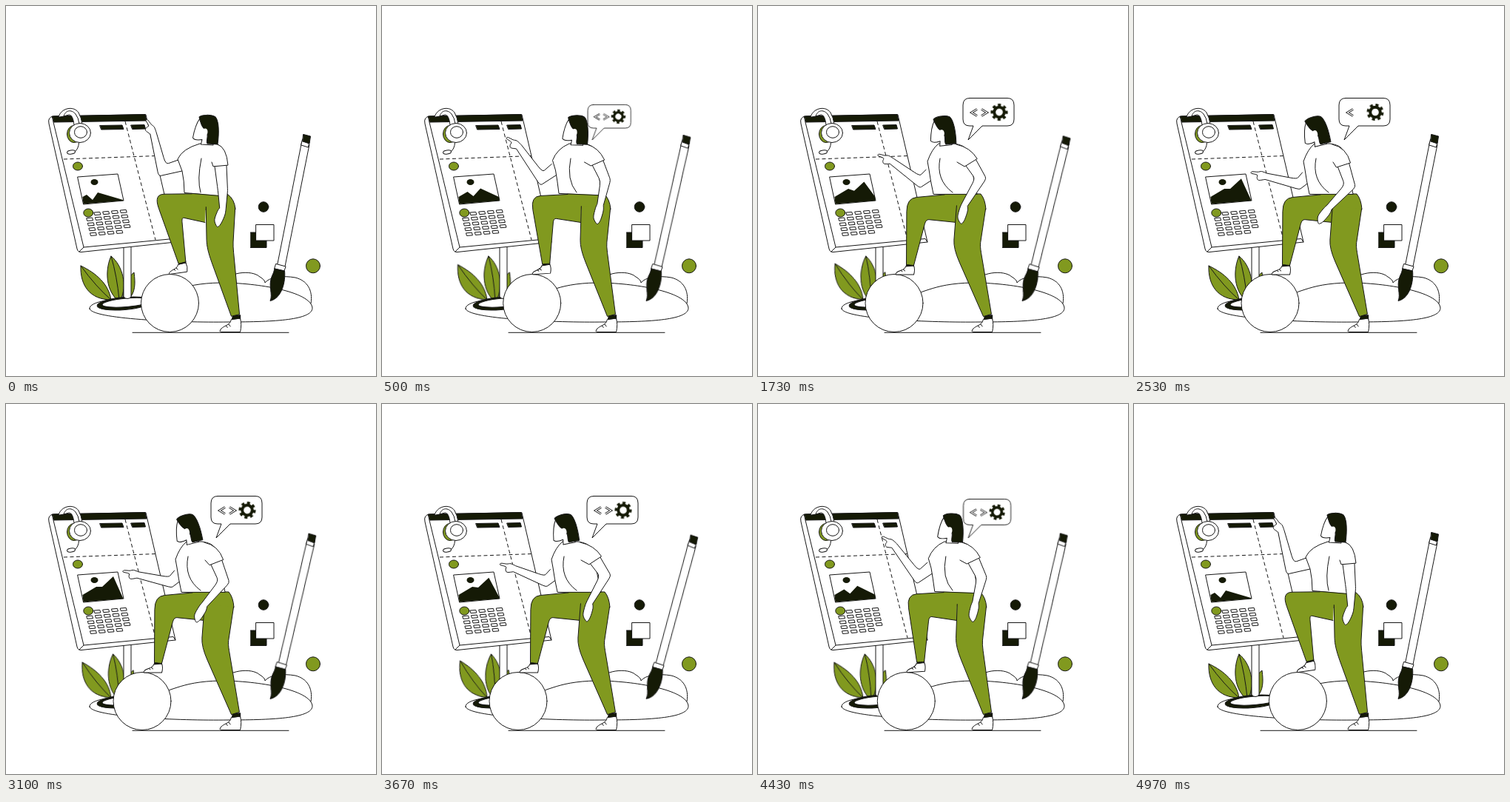
An HTML page that plays this animation: 500x500 px, repeating every 5000 ms.

```html
<!DOCTYPE html>
<html lang="en">
<head>
<meta charset="utf-8">
<title>Design board</title>
<style>
  html, body { margin: 0; width: 100%; height: 100%; overflow: hidden; background: #fff; }
  svg { display: block; width: 100vw; height: 100vh; }
  .line { fill: none; stroke: #161616; stroke-width: 1; stroke-linejoin: round; stroke-linecap: round; }
  .paper { fill: #fff; }
  .green { fill: #81991f; }
  .dark { fill: #151a06; }
  .solid { stroke: none; }
  .dash { stroke-dasharray: 5 3.5; stroke-linecap: butt; }

  .sway { animation: sway 1250ms cubic-bezier(.37,0,.63,1) infinite alternate; }
  @keyframes sway { to { transform: rotate(var(--turn)); } }
  #brush { --turn: 4deg; transform-origin: 358px 398px; }
  #leafA, #leafB { --turn: 5.5deg; transform-origin: 145px 397px; }
  #leafC { --turn: -3deg; transform-origin: 158px 397px; }

  #bubble { transform-origin: 284px 181px; animation: pop 5s cubic-bezier(.37,0,.63,1) infinite; }
  @keyframes pop {
    0%, 3% { transform: scale(0); }
    12.5%, 87% { transform: scale(1); }
    96.4%, 100% { transform: scale(0); }
  }
  #gear { transform-origin: 326px 143.5px; animation: spin 5s linear infinite; }
  @keyframes spin { to { transform: rotate(360deg); } }
  #teeth { stroke: #151a06; stroke-width: 4; stroke-dasharray: 1.05 .95; stroke-linecap: butt; }
  #close { animation: blink 2500ms step-end infinite; }
  @keyframes blink { 0% { opacity: 0; } 12% { opacity: 1; } }
  .rim { stroke-width: 2.8; stroke-linecap: butt; stroke-linejoin: miter; }
  .core { stroke: #fff; stroke-width: 1.2; stroke-linecap: butt; stroke-linejoin: miter; }
</style>
</head>
<body>
<svg viewBox="0 0 500 500" class="line">
  <!-- ground -->
  <path class="paper" d="M288 376C300 359 332 356 343 366Q350 370 350 374C356 366 374 364 391 367C407 371 415 384 412 402L350 410Z"/>
  <path class="paper" d="M113 409C112 399 145 395 190 393C224 391 232 375 290 374C340 374 412 386 414 408C414 424 365 427 300 427C235 428 114 423 113 409Z"/>
  <path d="M171 441.300H382"/>

  <!-- plant -->
  <g id="leafC" class="sway green"><path d="M158 396C157 378 164 367 173 360C175 375 175 387 166 396Z"/></g>
  <g id="leafA" class="sway">
    <path class="green" d="M142 397C139 376 122 361 101 351C100 377 113 397 142 397Z"/>
    <path d="M142 397Q122 380 101 351"/>
  </g>
  <g id="leafB" class="sway">
    <path class="green" d="M150 397C133 381 135 353 142 338C158 351 164 378 155 397Z"/>
    <path d="M153 397Q150 365 142 338"/>
  </g>

  <!-- stand -->
  <g transform="rotate(-5 160 402)">
    <ellipse class="dark" cx="160" cy="402" rx="37" ry="8.500"/>
    <ellipse class="paper" cx="163" cy="401" rx="33" ry="5.800"/>
  </g>
  <path class="paper" d="M159 320V393Q164 398 169 393V320Z"/>

  <!-- board -->
  <path class="paper" d="M64 149Q56 150 58 159L96 328Q97 333 102 332.500L229 319L189 147Z"/>
  <path d="M64 157L105 326L226 314.500L229 319M105 326L99 332"/>
  <path class="dark" d="M62.500 149L188 146.500L190 155L64.500 157Z"/>
  <path class="dark" d="M127 161.500L157 161L159 166.500L129 167ZM169 161L187 160.500L188.500 166L171 166.500Z"/>
  <path class="dash" d="M161 156L202 316M78 207L203 202.500"/>
  <ellipse class="green" cx="97" cy="216.500" rx="6.500" ry="5.500"/>
  <path class="paper" d="M97 231L151 227L159 263L105 268Z"/>
  <path id="hills" class="dark solid"/>
  <ellipse class="dark solid" cx="119.500" cy="238" rx="5" ry="4"/>
  <ellipse class="green" cx="111.300" cy="279.500" rx="6.500" ry="5.500"/>
  <path id="cells" class="paper"/>

  <!-- headset -->
  <path class="paper" d="M71 150C74 138 91 134 98 144Q102 151 103 160L92 161C91 152 89 147 85 147L78 149Z"/>
  <path d="M78 149C80 141 88 139 94 146Q98 151 99 159"/>
  <ellipse class="green" cx="92" cy="173" rx="9.500" ry="11.500"/>
  <ellipse class="paper" cx="100" cy="171.500" rx="14.500" ry="13"/>
  <ellipse cx="101" cy="170.500" rx="8.500" ry="7.800"/>
  <path d="M98.500 185Q98 193 93 197"/>
  <ellipse class="paper" cx="88" cy="197.500" rx="5.500" ry="2.500" transform="rotate(-8 88 197.500)"/>

  <!-- loose shapes -->
  <circle class="dark" cx="348" cy="271.500" r="6.800"/>
  <path class="dark" d="M330.500 306H352V326.500H330.500Z"/>
  <path class="paper" d="M338 295.500H362V317H338Z"/>
  <circle class="green" cx="415" cy="351.300" r="9.500"/>
  <g id="brush" class="sway">
    <path class="paper" d="M400 184L410 187L377 352L367 350Z"/>
    <path class="paper" d="M401 180L410 183L408.500 191L399 188Z"/>
    <path class="dark" d="M402 173.500L411.500 176L410 186L401 183Z"/>
    <path class="paper" d="M365 348.500L378 352L376 358L363 355Z"/>
    <path class="dark" d="M363 355L376.500 358C378 372 373 395 357 398.500C361 389 354 379 359 366Q362 360 363 355Z"/>
  </g>

  <!-- speech bubble -->
  <g id="bubble">
    <path class="paper" d="M286 124.500H337Q346 124.500 346 134V153Q346 162 337 162H303L284 181L291 162H286Q277 162 277 153V134Q277 124.500 286 124.500Z"/>
    <g><path class="rim" d="M296 139.500L288.500 144L296 148.500"/><path class="core" d="M296 139.500L288.500 144L296 148.500"/></g>
    <g id="close"><path class="rim" d="M302 139.500L309.500 144L302 148.500"/><path class="core" d="M302 139.500L309.500 144L302 148.500"/></g>
    <g id="gear">
      <circle class="dark solid" cx="326" cy="143.500" r="8.800"/>
      <circle id="teeth" cx="326" cy="143.500" r="9.500" pathLength="16"/>
      <circle class="paper solid" cx="326" cy="143.500" r="4.800"/>
    </g>
  </g>

  <!-- person -->
  <circle id="ball" class="paper" cy="401.500" r="39"/>
  <path id="farArm" class="paper"/>
  <g id="farShoe"></g>
  <g id="nearShoe" transform="translate(311 421) scale(1.12 1.5)"></g>
  <path id="farLeg" class="green"/>
  <path id="hip" class="green"/>
  <path id="nearLeg" class="green"/>
  <path id="shirt" class="paper"/>
  <path id="crease"/>
  <g id="head">
    <path class="paper" d="M262 152C256 160 254 170 252.500 178C254 181 258 181.500 265 180.500L263.500 187L280 188V160Z"/>
    <path class="dark" d="M261 150C264 147 277 146 283 150C288 155 288 172 286 187L272 186C270 183 273 178 272 174C272 168 266 166 264 160Q262 155 261 150Z"/>
    <ellipse class="paper solid" cx="269" cy="170" rx="3.500" ry="4.500"/>
  </g>
  <path id="nearArm" class="paper"/>
  <path id="sleeve" class="paper"/>
</svg>

<script>
const $ = id => document.getElementById(id);
const draw = (id, d) => $(id).setAttribute('d', d);
const LOOP = 5000;

// Eased 0..1 between two times, and the same going up and down again.
const ramp = (t, a, b) => (1 - Math.cos(Math.PI * Math.min(1, Math.max(0, (t - a) / (b - a))))) / 2;
const hump = (t, a, b, c, d) => ramp(t, a, b) * (1 - ramp(t, c, d));

const fix = p => p.map(v => v.toFixed(2)).join(' ');
const poly = pts => 'M' + pts.map(fix).join('L');
const mix = (a, b, k) => [a[0] + (b[0] - a[0]) * k, a[1] + (b[1] - a[1]) * k];
const off = (p, n, r) => [p[0] + n[0] * r, p[1] + n[1] * r];
const normal = (a, b) => {
  const x = b[0] - a[0], y = b[1] - a[1], l = Math.hypot(x, y);
  return [-y / l, x / l];
};

// Curve through the points, without the leading command.
function smooth(pts) {
  let d = fix(pts[0]);
  for (let i = 0; i < pts.length - 1; i++) {
    const a = pts[i - 1] || pts[i], b = pts[i], c = pts[i + 1], e = pts[i + 2] || c;
    d += 'C' + fix([b[0] + (c[0] - a[0]) / 6, b[1] + (c[1] - a[1]) / 6]) + ' ' +
      fix([c[0] - (e[0] - b[0]) / 6, c[1] - (e[1] - b[1]) / 6]) + ' ' + fix(c);
  }
  return d;
}

// Tapered outline along root, joint and tip, with an optional hand.
function limb(root, joint, tip, [r0, r1, r2], hand = [], angle = 0) {
  const n1 = normal(root, joint), n2 = normal(joint, tip);
  const dot = 1 + n1[0] * n2[0] + n1[1] * n2[1];
  const bend = [(n1[0] + n2[0]) / dot, (n1[1] + n2[1]) / dot];
  const side = s => [off(root, n1, s * r0), off(joint, bend, s * r1), off(tip, n2, s * r2)];
  const near = side(1), far = side(-1);
  const round = ([a, b, c], k) => fix(mix(a, b, 1 - k)) + 'Q' + fix(b) + ' ' + fix(mix(b, c, k));
  const back = [...far].reverse();
  const r = angle * Math.PI / 180, cos = Math.cos(r), sin = Math.sin(r);
  const fingers = hand.map(([x, y]) => [tip[0] + x * cos - y * sin, tip[1] + x * sin + y * cos]);
  return `M${fix(near[0])}L${round(near, .2)}L` + smooth([near[2], ...fingers, far[2]]) +
    `L${round(back, .1)}L${fix(far[0])}`;
}

const pointing = [[7, 5], [12, 3], [19.5, 1.5], [20, -1], [12, -1], [11, -5], [8, -7.5]];
const relaxed = [[6, 6], [18, 7], [25, 3], [26, 0], [20, -3], [8, -5]];
const armWidth = [8, 6.5, 4.3];

function frame(t) {
  const back = hump(t, 0, 1000, 3950, 5000);     // stepping back with the ball
  const lower = hump(t, 900, 2700, 3300, 4500);  // pointing hand going down
  const swing = hump(t, 900, 2500, 2600, 4700);  // free arm coming forward
  const reach = 1 - (1 - back) ** 3;             // hand leaving the board edge

  // Legs
  const ankle = [238 - 32.5 * back, 347 + 3 * back];
  $('ball').setAttribute('cx', 221.5 - 37.5 * back);
  $('farShoe').setAttribute('transform', `translate(${ankle}) rotate(${-8 * (1 - back)})`);
  draw('farLeg', limb([270 - 2 * back, 273], [218.5 - 4.5 * back, 270 + 4 * back], ankle, [19.5, 14.5, 5]));
  draw('hip', `M250 253L${299 + 2 * back} 254Q${309 - 2 * back} 261 ${310 - 2 * back} 275H270`);
  draw('nearLeg', limb([290 - 2 * back, 272], [289 - 7 * back, 326], [310, 418], [19.7, 17.7, 5.7]));

  // Shirt
  const neck = 262 - 18 * back, shoulder = 294 - 11 * back, cuff = 232 - 3 * back;
  draw('shirt', `M${299 - 3 * back} ${257 - 3 * back}L${295 - 6 * back} 221L${shoulder} 196` +
    `Q${shoulder - 3} 188 ${neck + 21} 186H${neck}Q${cuff + 6} 193 ${cuff} ${207 + 3 * back}` +
    `L${cuff + 6 - 4 * back} ${223 - 2 * back}Q${241 - 8 * back} 236 ${241 - 4 * back} ${252 + 2 * back}Z`);
  draw('crease', `M${neck + 2} 206Q${neck - 4} 235 263 252`);
  $('head').setAttribute('transform',
    `translate(${-17 * back - 4 * lower} ${back}) rotate(${-3 * back - 15 * lower} 272 182)`);

  // Arms
  draw('farArm', limb(
    [237 - 6 * back + 2 * lower, 215 + 10 * back + 6 * lower],
    [211 + 5 * reach + 6 * lower, 222 + 13 * reach + 6 * lower],
    [199 - 16 * reach - 5 * lower, 172 + 21 * reach + 38 * lower],
    armWidth, pointing, 243 - 30 * reach - 19 * lower));
  const top = [290 + 3 * back - 10 * swing, 216 - 8 * back + 7 * swing];
  const elbow = [293 + 18 * back - 19 * swing, 250 - 28 * back + 21 * swing];
  const wrist = [293 + 4 * back - 33 * swing, 273 - 9 * back + 8 * swing];
  draw('nearArm', limb(top, elbow, wrist, armWidth, relaxed, 104 - 14 * back + 31 * swing * swing));
  const hem = normal(top, elbow);
  draw('sleeve', `M${neck + 24} 187Q${shoulder + 4} 191 ${fix(off(top, hem, -10))}` +
    `L${fix(off(top, hem, 10))}L${neck + 16 + 9 * back} 211`);

  // Picture on the board
  draw('hills', poly([
    [103.5, 258],
    [109 + 13 * back, 255 - 8 * back],
    [117 + 13 * back, 262 - 10 * back - 5 * lower],
    [124 + 18 * back + 3 * lower, 252 - 11 * back - 8 * lower],
    [158, 262 - 8 * back + 8 * lower],
    [158.5, 263], [104.5, 267.5]]) + 'Z');
}

let cells = '';
for (let r = 0; r < 5; r++) for (let c = 0; c < 5; c++) {
  if (r === c && r % 4 === 0) continue;
  cells += `M${107.5 + 1.6 * r + 11.8 * c} ${280 - c + 6.7 * r}l7.500 -.6l1 3.600l-7.500 .6Z`;
}
draw('cells', cells);

for (const id of ['farShoe', 'nearShoe']) $(id).innerHTML =
  '<path class="dark" d="M-4 -2H5L5 2H-5Z"/>' +
  '<path class="paper" vector-effect="non-scaling-stroke" d="M-6 2C-7 7 -14 7 -18 10Q-21 13 -18 13H5Q7 6 5 1Z"/>' +
  '<path vector-effect="non-scaling-stroke" d="M-9 6L-7 8M-12 7.500L-10.500 9"/>';

const start = performance.now();
function tick() {
  frame((performance.now() - start) % LOOP);
  requestAnimationFrame(tick);
}
tick();
</script>
</body>
</html>
```
